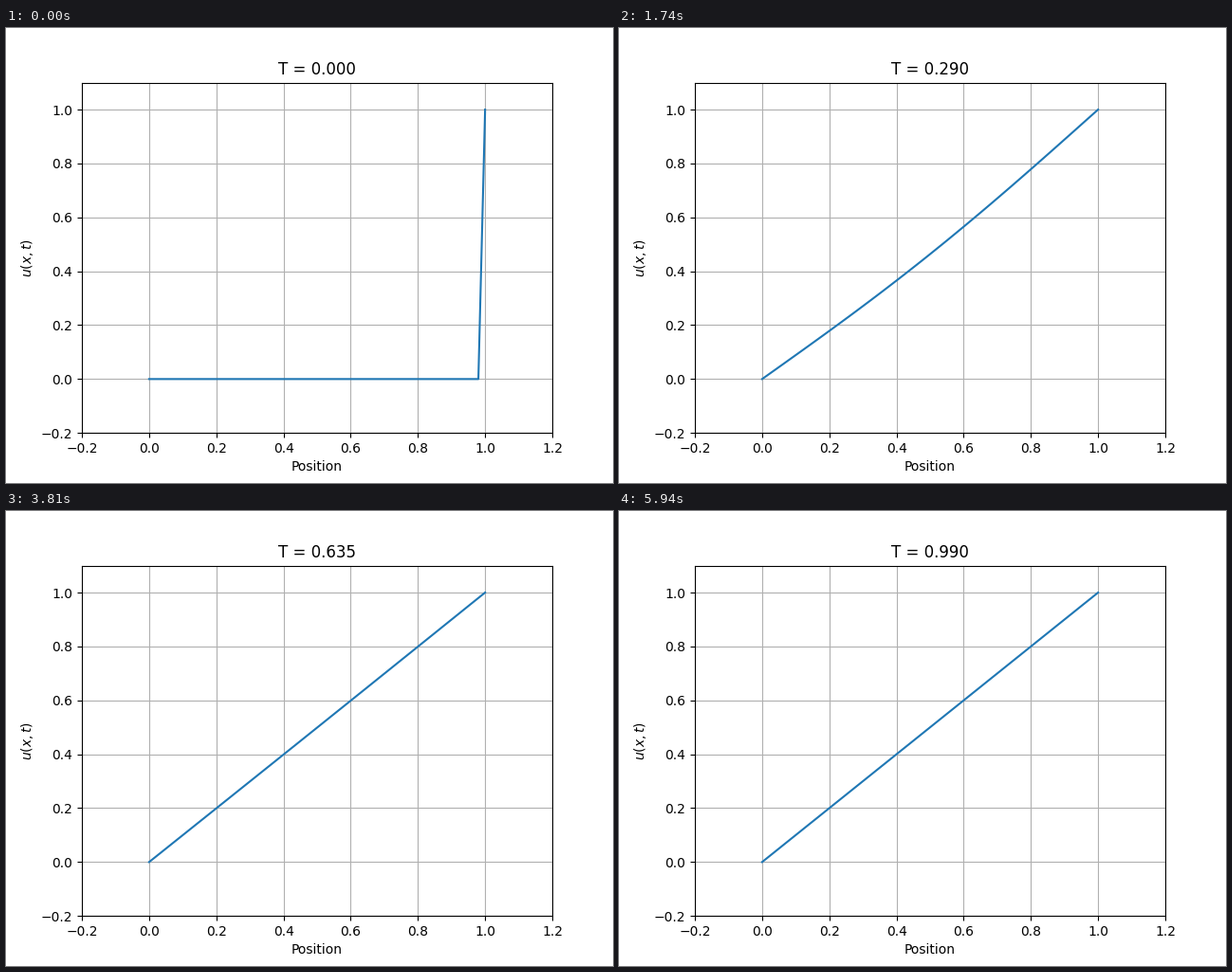
These frames come from a looping animation (640 px wide and 480 px high, 5.97 s). A matplotlib script:

```python
import numpy as np
import matplotlib.pyplot as plt
from matplotlib.animation import FuncAnimation

FRAMES = 199
INTERVAL = 30   # ms
DT = 0.005      # simulated time per frame
N = 50          # grid cells on [0, 1]

# Heat equation with u(0) = 0, u(1) = 1, solved in discrete sine modes.
x = np.linspace(0, 1, N + 1)
start = np.where(np.arange(N + 1) == N, 1.0, 0.0)
k = np.arange(1, N)
modes = np.sin(np.pi * np.outer(x, k))
rates = (2 * N * np.sin(k * np.pi / (2 * N))) ** 2
coeffs = 2 / N * modes.T @ (start - x)


def solution(t):
    return x + modes @ (coeffs * np.exp(-rates * t))


plt.rcParams["font.family"] = "DejaVu Sans"
fig, ax = plt.subplots(figsize=(6.4, 4.8), dpi=100)
ax.set(xlim=(-0.2, 1.2), ylim=(-0.2, 1.1),
       xlabel="Position", ylabel="$u(x,t)$")
ax.grid(True)
line, = ax.plot(x, solution(0), color="#1f77b4", lw=1.5)
title = ax.set_title("T = 0.000")


def update(i):
    t = i * DT
    line.set_ydata(solution(t))
    title.set_text(f"T = {t:.3f}")
    return line, title


anim = FuncAnimation(fig, update, frames=FRAMES, interval=INTERVAL,
                     repeat=True, repeat_delay=0, blit=False)
plt.show()
```
